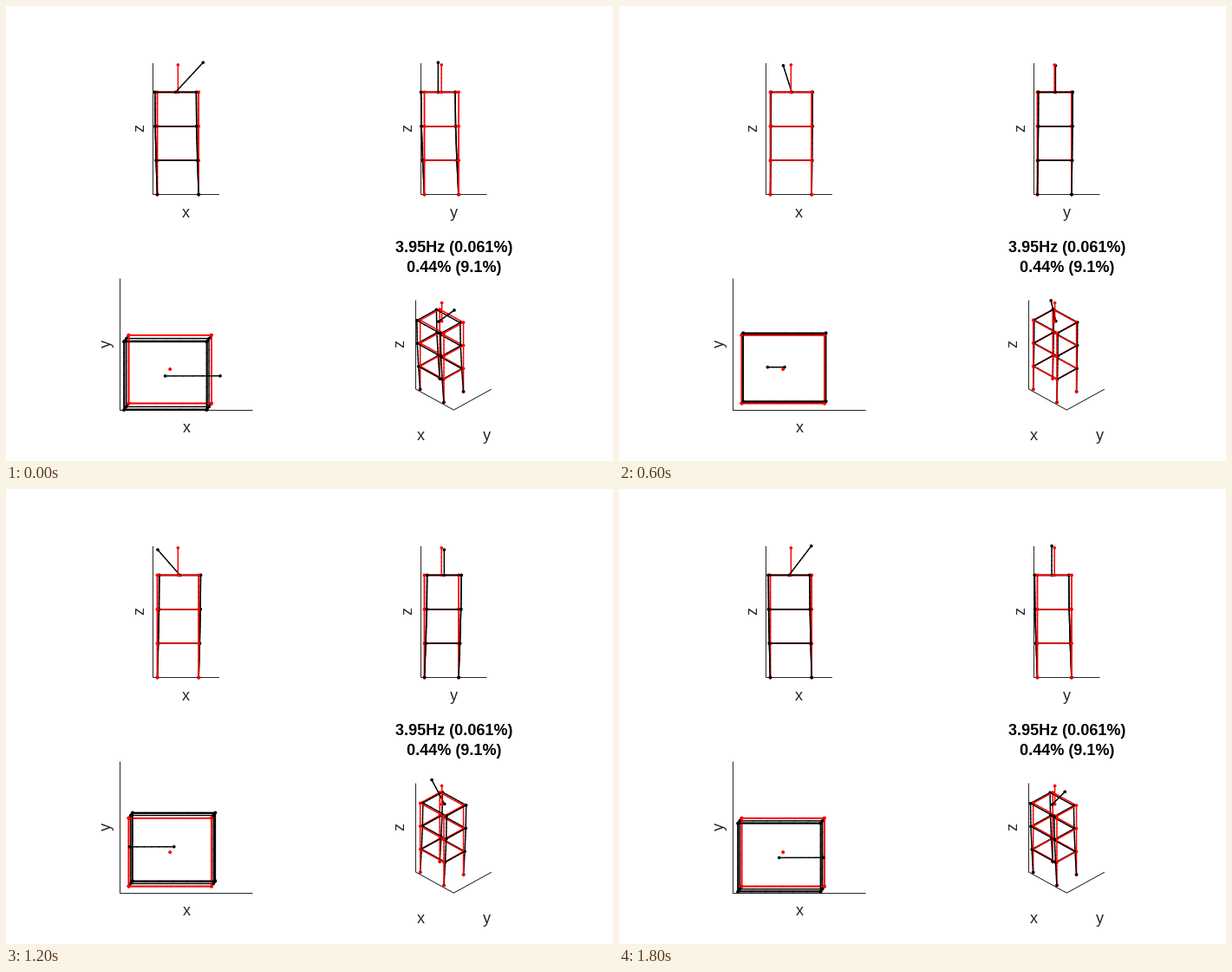
These frames come from a looping animation (700 px wide and 525 px high, 2000 ms). A matplotlib script:

```python
import numpy as np
import matplotlib.pyplot as plt
from matplotlib.animation import FuncAnimation
from matplotlib.collections import LineCollection

W, H, DPI = 700, 525, 100
PX = 72 / DPI
FRAMES, INTERVAL = 10, 200
PIECES = 6
LINE, DOT = 1.45 * PX, 3.7 * PX
RED, BLACK, GREY = "#ff0000", "#000000", "#262626"

BOX = np.array([76.5, 76, 151.5])
STOREYS, STOREY = 3, 39.35
FRAME_SWAY = np.array([-2.8, -3.9, 0])
MAST_SWAY = np.array([28.9, -3.85, 2.7])


class View:
    """Parallel projection seen from an azimuth and elevation in degrees."""

    def __init__(self, origin, azimuth, elevation, scale, trail):
        a, e = np.radians([azimuth, elevation])
        right = np.array([np.cos(a), np.sin(a), 0])
        up = np.array([-np.sin(e) * np.sin(a), np.sin(e) * np.cos(a), np.cos(e)])
        self.viewer = np.cross(right, up)
        self.basis = scale * np.column_stack([right, -up])
        self.origin = np.array(origin)
        self.trail = trail
        self.tilted = 0 < elevation < 90

    def project(self, point):
        return self.origin + point @ self.basis


# The trail names the axes in drawing order; "o" is the origin
VIEWS = [
    View((169.5, 217.5), 0, 0, 1, "zox"),
    View((478.5, 217.5), 90, 0, 1, "zoy"),
    View((131.5, 466.5), 0, 90, 2, "yox"),
    View((472.5, 442.0), 45, 33.4, 0.81, "zoxy"),
]


def build_tower():
    """Return nodes, their mode shape and the members joining them."""
    x0, x1, y0, y1 = 5, 52.7, 4, 43.4
    corners = [(x0, y0), (x1, y0), (x1, y1), (x0, y1)]
    nodes, shape, members = [], [], []
    for level in range(STOREYS + 1):
        sway = max(0.02, np.sin(np.pi / 2 * level / STOREYS))
        for i, (x, y) in enumerate(corners):
            n = len(nodes)
            nodes.append((x, y, level * STOREY))
            shape.append(FRAME_SWAY * sway)
            if level:
                members += [(n, 4 * level + (i + 1) % 4), (n - 4, n)]
    n = len(nodes)
    top = np.array([(x0 + x1) / 2, (y0 + y1) / 2, STOREYS * STOREY])
    nodes += [top, top + (0, 0, 31.5)]
    shape += [FRAME_SWAY, MAST_SWAY]
    members.append((n, n + 1))
    return np.array(nodes, float), np.array(shape), members


NODES, SHAPE, MEMBERS = build_tower()


def tower_parts(amount, color):
    """Yield start, end, depth point, width and colour of every small part."""
    shift = SHAPE * amount
    cuts = np.linspace(0, 1, PIECES + 1)
    for a, b in MEMBERS:
        span, bend = NODES[b] - NODES[a], shift[b] - shift[a]
        axis = span / np.linalg.norm(span)
        for t0, t1 in zip(cuts[:-1], cuts[1:]):
            start, end = (NODES[a] + shift[a] + (span + bend) * t
                          for t in (t0, t1))
            # Sliding along the member does not change what covers what
            t = (t0 + t1) / 2
            move = shift[a] + bend * t
            depth = NODES[a] + span * t + move - (move @ axis) * axis
            yield start, end, depth, LINE, color
    for p in NODES + shift:
        yield p, p, p, DOT, color


def draw_list(amount):
    parts = list(tower_parts(0, RED)) + list(tower_parts(amount, BLACK))
    lines, widths, colors = [], [], []
    for view in VIEWS:
        def depth(part):
            return round(part[2] @ view.viewer + 0.01 * (part[3] == DOT), 6)

        for start, end, _, width, color in sorted(parts, key=depth):
            p, q = view.project(start), view.project(end)
            if width == DOT:
                q = q + (0.05, 0)
            lines.append((p, q))
            widths.append(width)
            colors.append(color)
    return lines, widths, colors


fig = plt.figure(figsize=(W / DPI, H / DPI), dpi=DPI, facecolor="white")
ax = fig.add_axes([0, 0, 1, 1])
ax.set_xlim(0, W)
ax.set_ylim(H, 0)
ax.axis("off")


def label(x, y, text, **style):
    options = dict(ha="center", va="baseline", color=GREY,
                   family="Liberation Sans", fontsize=18 * PX)
    ax.text(x, y, text, **{**options, **style})


def draw_axes(view):
    spot, path = np.zeros(3), []
    for name in view.trail:
        if name == "o":
            spot = np.zeros(3)
            path.append(view.project(spot))
            continue
        step = BOX * [name == c for c in "xyz"]
        path.append(view.project(spot + step))
        x, y = view.project(spot + step / 2)
        if "o" in view.trail[:view.trail.index(name)]:
            spot = spot + step
            slope = np.sign((step @ view.basis)[1]) if view.tilted else 0
            label(x - 16 * slope, y + 26 + 21 * view.tilted, name)
        else:
            label(x - (18 if view.tilted else 15), y - 1, name,
                  rotation=90, va="center")
    ax.plot(*zip(*path), color=GREY, lw=PX, snap=False,
            solid_joinstyle="miter", solid_capstyle="butt")


for view in VIEWS:
    draw_axes(view)
label(516.5, 284, "3.95Hz (0.061%)", weight="bold", color=BLACK)
label(516.5, 307, "0.44% (9.1%)", weight="bold", color=BLACK)

towers = LineCollection([], capstyle="round", zorder=3)
towers.set_snap(False)
ax.add_collection(towers, autolim=False)


def update(frame):
    lines, widths, colors = draw_list(np.cos(2 * np.pi * frame / FRAMES))
    towers.set_segments(lines)
    towers.set_linewidths(widths)
    towers.set_colors(colors)
    return [towers]


anim = FuncAnimation(fig, update, frames=FRAMES, interval=INTERVAL,
                     repeat=True, repeat_delay=0)
plt.show()
```
